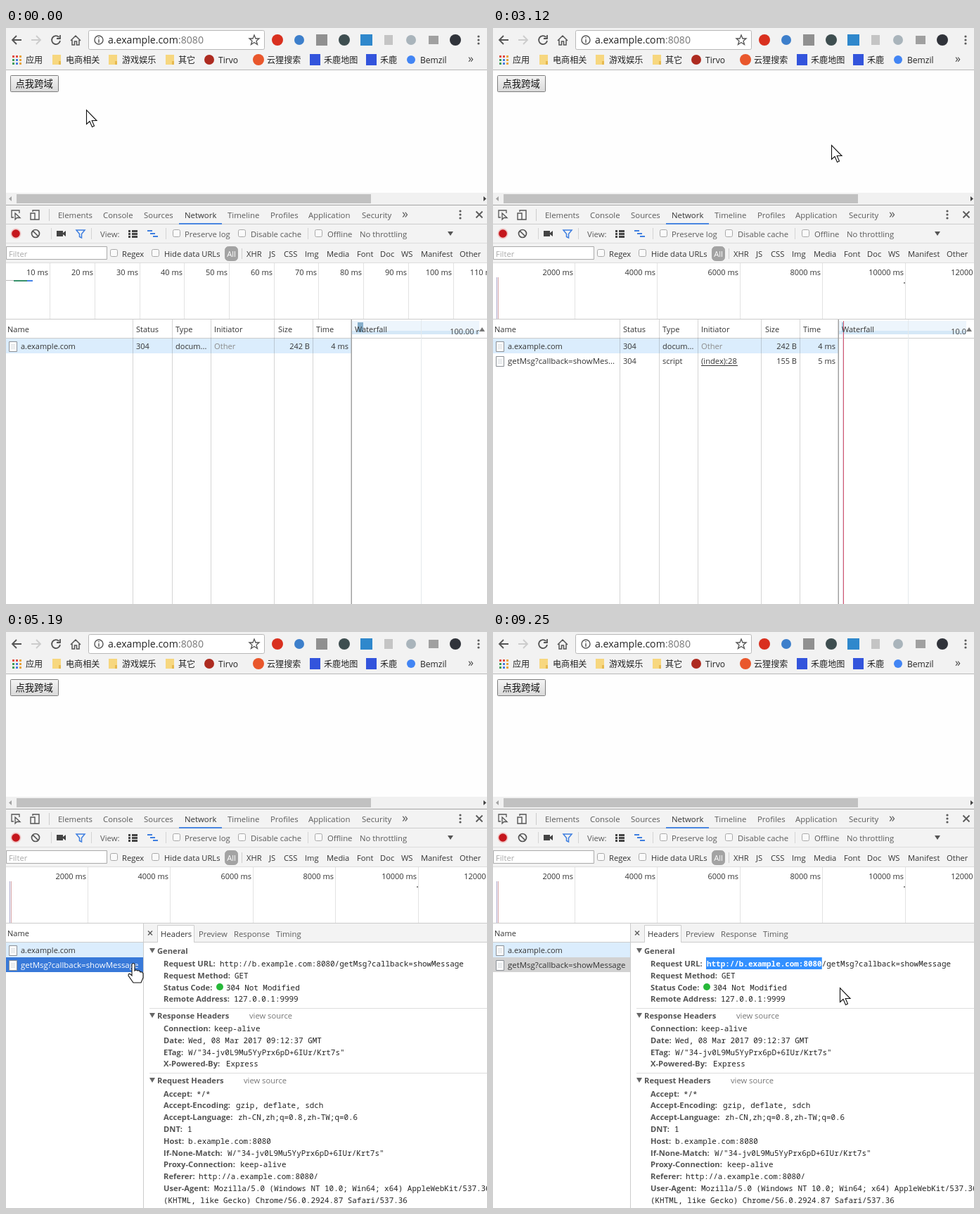
Animation of 684 by 818 pixels, one loop 9.49 s. Source, as an HTML page with a canvas:

```html
<!DOCTYPE html>
<html lang="zh-CN">
<head>
<meta charset="utf-8">
<title>JSONP demo</title>
<style>
html, body { margin: 0; width: 100%; height: 100%; overflow: hidden; background: #fff; }
canvas { display: block; }
</style>
</head>
<body>
<canvas width="684" height="818"></canvas>
<script>
const W = 684, H = 818, LOOP = 9490;
const c = document.querySelector('canvas').getContext('2d');
const SANS = '"Open Sans", "Noto Sans CJK SC", "Noto Sans CJK", sans-serif';
const MONO = '"Noto Sans Mono", monospace';
const URL_TEXT = 'http://b.example.com:8080/getMsg?callback=showMessage';
const ORIGIN_LENGTH = 25, CHAR = 6.55;

// Moments of the hard changes, in ms
const PRESS = 760, RELEASE = 850, LOADED = 960, DETAILS = 4390, TIP_END = 4460, BLUR = 6010;

// Pointer track: time, x, y
const TRACK = [
  [0, 114, 116], [260, 114, 116], [580, 52, 81], [1300, 52, 81], [1740, 130, 92],
  [2130, 291, 98], [2630, 452, 155], [2690, 460, 158], [2850, 481, 166], [3240, 481, 166],
  [3620, 250, 385], [4210, 90, 473], [4800, 90, 473], [5710, 304, 469], [6180, 304, 469],
  [6890, 457, 474], [6960, 458, 474], [7330, 468, 475], [8330, 468, 475], [8500, 486, 483],
  [9000, 486, 483], [9250, 493, 505], [LOOP, 493, 505]
];

const clamp = v => Math.max(0, Math.min(1, v));

function pointerAt(t) {
  const i = Math.max(1, TRACK.findIndex(k => k[0] > t));
  const [t0, x0, y0] = TRACK[i - 1], [t1, x1, y1] = TRACK[i];
  const p = (t - t0) / (t1 - t0);
  return [Math.round(x0 + (x1 - x0) * p), Math.round(y0 + (y1 - y0) * p)];
}

function rect(x, y, w, h, fill) {
  c.fillStyle = fill;
  c.fillRect(x, y, w, h);
}

function box(x, y, w, h, fill, border, radius = 0) {
  c.beginPath();
  c.roundRect(x + .5, y + .5, w - 1, h - 1, radius);
  c.fillStyle = fill;
  c.fill();
  c.strokeStyle = border;
  c.lineWidth = 1;
  c.stroke();
}

const vline = (x, y0, y1, color) => rect(x, y0, 1, y1 - y0, color);
const hline = (y, x0, x1, color) => rect(x0, y, x1 - x0, 1, color);

function disc(x, y, r, fill) {
  c.fillStyle = fill;
  c.beginPath();
  c.arc(x, y, r, 0, 7);
  c.fill();
}

function path(d, x, y, { fill, stroke, width = 1 }) {
  const p = new Path2D(d);
  c.save();
  c.translate(x, y);
  if (fill) { c.fillStyle = fill; c.fill(p); }
  if (stroke) { c.strokeStyle = stroke; c.lineWidth = width; c.stroke(p); }
  c.restore();
}

function text(s, x, y, size = 11, color = '#333', { align = 'left', weight = 400, family = SANS } = {}) {
  c.font = `${weight} ${size}px ${family}`;
  c.textAlign = align;
  c.fillStyle = color;
  c.fillText(s, x, y);
}

const mono = (s, x, y, color = '#222', weight) => text(s, x, y, 10.92, color, { family: MONO, weight });
const bold = (s, x, y) => text(s, x, y, 11.2, '#545454', { weight: 700 });
const checkbox = (x, y, s = 11) => box(x, y, s, s, '#fafafa', '#a8a8a8', 2);
const dots = (x, y) => [-5, 0, 5].forEach(d => disc(x, y + d, 1.6, '#5a5a5a'));
const cross = (x, y, r, width, color = '#5a5a5a') =>
  path(`M${-r} ${-r}L${r} ${r}M${r} ${-r}L${-r} ${r}`, x, y, { stroke: color, width });

function drawBrowser() {
  rect(0, 0, W, 59, '#f2f2f2');
  hline(59, 0, W, '#b9b9b9');
  const ink = { stroke: '#555', width: 1.8 };
  path('M14 6H1M7 0L1 6L7 12', 8, 11, ink);
  path('M0 6H13M7 0L13 6L7 12', 36, 11, { stroke: '#ccc', width: 1.8 });
  path('M4.5 -4A6 6 0 1 0 6 1M6 -7V-2H1', 71, 17, ink);
  path('M-7 1L0 -6L7 1M-5 0V7H-1.5V2H1.5V7H5V0', 99, 17, { stroke: '#555', width: 1.5 });
  box(117, 3, 251, 28, '#fff', '#b8b8b8', 2);
  path('M6 0A6 6 0 1 1 -6 0A6 6 0 1 1 6 0M0 -1V4M0 -4V-2.5', 132, 17, { stroke: '#555', width: 1.4 });
  text('a.example.com', 145, 22, 14.1, '#222');
  text(':8080', 245, 22, 14.1, '#777');
  path('M0 -7L2 -2L7 -2L3 1.5L4.5 6.5L0 3.5L-4.5 6.5L-3 1.5L-7 -2L-2 -2Z', 353, 17, { stroke: '#555', width: 1.3 });

  disc(386, 17, 8, '#d9301f');
  disc(417, 17, 7, '#3d7fcb');
  rect(441, 9, 16, 16, '#909090');
  disc(481, 17, 8, '#3e4e50');
  rect(504, 9, 17, 16, '#2f88cc');
  rect(538, 10, 12, 14, '#c4c4c4');
  disc(576, 17, 7, '#a9b4bb');
  rect(601, 11, 14, 12, '#a0a0a0');
  disc(639, 17, 8, '#30333a');
  dots(672, 17);

  const grid = ['#e04a3f', '#e04a3f', '#e8a33a', '#3f9d58', '#4a7ee0', '#e8a33a', '#3f9d58', '#4a7ee0', '#e8a33a'];
  grid.forEach((color, i) => rect(9 + i % 3 * 5, 39 + Math.floor(i / 3) * 5, 3, 3, color));
  [66, 146, 227].forEach(x => {
    rect(x, 38, 12, 14, '#f7d77f');
    rect(x + 9, 47, 3, 5, '#e6b94f');
  });
  disc(289, 45, 7, '#ad2b20');
  disc(359, 45, 8, '#e9572c');
  rect(432, 37, 15, 16, '#3354dc');
  rect(512, 37, 15, 16, '#3354dc');
  disc(576, 45, 6, '#4285f4');
  const marks = [['应用', 28], ['电商相关', 85], ['游戏娱乐', 165], ['其它', 245], ['Tirvo', 302],
    ['云狸搜索', 371], ['禾鹿地图', 452], ['禾鹿', 532], ['Bemzil', 589]];
  marks.forEach(([s, x]) => text(s, x, 49.5, 12.1, '#222'));
  text('»', 657, 49, 16, '#444');
}

function drawPage(t, x, y) {
  rect(0, 60, W, 174, '#fefefe');
  const pressed = t >= PRESS && t < RELEASE;
  const hover = x >= 6 && x < 75 && y >= 68 && y < 91;
  const shade = c.createLinearGradient(0, 68, 0, 90);
  shade.addColorStop(0, pressed ? '#d8d8d8' : hover ? '#fafafa' : '#f4f4f4');
  shade.addColorStop(1, pressed ? '#eee' : hover ? '#e2e2e2' : '#dadada');
  box(6, 67, 69, 24, shade, hover ? '#666' : '#7c7c7c', 1);
  text('点我跨域', 13.5, 84, 13.33, '#111');

  rect(0, 234, W, 17, '#f1f1f1');
  rect(15, 236, 504, 13, '#c1c1c1');
  path('M4 0V7L0 3.5Z', 4, 239, { fill: '#a3a3a3' });
  path('M0 0V7L4 3.5Z', 679, 239, { fill: '#444' });
}

function drawTools() {
  rect(0, 251, W, 83, '#f3f3f3');
  hline(251, 0, W, '#a5a5a5');
  [278, 305, 333].forEach((y, i) => hline(y, 0, W, i ? '#ddd' : '#ccc'));
  path('M4 11H1V1H12V5M6 5V14L8.5 11.5H13Z', 7, 258, { stroke: '#555', width: 1.3 });
  path('M4 3V1H13V14H7M1 5H7V14H1Z', 34, 258, { stroke: '#555', width: 1.4 });
  vline(61, 257, 274, '#ccc');
  const tabs = [['Elements', 74], ['Console', 138], ['Sources', 196], ['Network', 254], ['Timeline', 315],
    ['Profiles', 376], ['Application', 430], ['Security', 506]];
  tabs.forEach(([s, x]) => text(s, x, 270, 11.4, s === 'Network' ? '#333' : '#5a5a5a'));
  rect(246, 277, 61, 2, '#4a86e0');
  text('»', 563, 270, 18, '#5a5a5a');
  dots(646, 265);
  cross(673, 265, 4.5, 1.8);

  disc(14, 292, 7.5, '#f0c9c9');
  disc(14, 292, 5.8, '#c5161c');
  path('M5.5 0A5.5 5.5 0 1 1 -5.5 0A5.5 5.5 0 1 1 5.5 0M-4 -4L4 4', 42, 292, { stroke: '#555', width: 1.7 });
  path('M0 0H9V3L13 0V8L9 5V8H0Z', 72, 288, { fill: '#444' });
  path('M0 0H12L7.5 5.5V11L4.5 9.5V5.5Z', 100, 287, { stroke: '#3f7fe0', width: 1.5 });
  [64, 121, 227, 429].forEach(x => vline(x, 284, 300, '#d4d4d4'));
  text('View:', 134, 296.5, 11.3, '#5a5a5a');
  [287, 291, 295].forEach((y, i) => {
    rect(174, y, 3, 3, '#444');
    rect(179, y, 8, 3, '#444');
    rect(201 + i * 4, y, 7, 2, '#3f7fe0');
  });
  [237, 330, 439].forEach(x => checkbox(x, 286));
  [['Preserve log', 254], ['Disable cache', 348], ['Offline', 457], ['No throttling', 503]]
    .forEach(([s, x]) => text(s, x, 296.5, 11.3, '#5a5a5a'));
  path('M0 0H8L4 6Z', 628, 289, { fill: '#555' });

  box(0, 310, 144, 19, '#fff', '#aaa');
  text('Filter', 4, 325, 11.2, '#aaa');
  checkbox(148, 314);
  checkbox(207, 314);
  text('Regex', 165, 324.5, 11.2);
  text('Hide data URLs', 225, 324.5, 11.2);
  box(311, 310, 19, 21, '#a3a3a3', '#a3a3a3', 5);
  text('All', 320.5, 325, 11.2, '#fff', { align: 'center' });
  vline(335, 313, 328, '#ccc');
  [['XHR', 342], ['JS', 374], ['CSS', 395], ['Img', 425], ['Media', 456], ['Font', 499], ['Doc', 532],
    ['WS', 562], ['Manifest', 590], ['Other', 645]].forEach(([s, x]) => text(s, x, 325, 11.2));
}

function drawOverview(loaded) {
  rect(0, 334, W, 79, '#fff');
  const gap = loaded ? 117.4 : 63.7, unit = loaded ? 2000 : 10;
  for (let i = 1; i < 12; i++) {
    const x = Math.round(i * gap - 1.5);
    if (x < W) vline(x, 334, 413, '#e2e2e2');
    text(`${i * unit} ms`, x - 2, 351, 11, '#333', { align: 'right' });
  }
  if (loaded) {
    vline(5, 354, 413, '#a9a3c9');
    vline(7, 354, 413, '#d3a3a8');
    rect(584, 361, 2, 2, '#888');
  } else {
    rect(0, 358, 11, 1, '#bbb');
    rect(11, 358, 19, 2, '#36906a');
    rect(30, 358, 8, 2, '#4382e8');
  }
  hline(413, 0, W, '#ccc');
}

function fileIcon(y) {
  box(4, y, 12, 15, '#fff', '#8b9096');
  for (let i = 4; i < 12; i += 2) hline(y + i, 7, 13, '#d9dde0');
}

function drawTable(loaded) {
  rect(0, 414, W, H - 414, '#fff');
  rect(0, 441, 491, 21, '#dbedfd');
  rect(492, 416, 181, 14, '#edf5fc');
  rect(492, 430, 181, 5, '#d5e8f7');
  hline(440, 0, W, '#ccc');
  [180, 236, 291, 381, 436].forEach(x => vline(x, 414, H, 'rgba(90,90,90,.25)'));
  vline(590, 414, H, '#e4e9ec');
  rect(490.5, 414, 1.5, H - 414, '#a2a2a2');
  if (loaded) {
    rect(496, 418, 3, 14, '#a6c6de');
    vline(497, 432, H, '#e6d6e4');
    vline(498, 416, H, '#d2566f');
  } else {
    rect(500, 418, 8, 14, '#86aeca');
  }
  [['Name', 2], ['Status', 185], ['Type', 241], ['Initiator', 296], ['Size', 387], ['Time', 441], ['Waterfall', 496]]
    .forEach(([s, x]) => text(s, x, 432));
  text(loaded ? '10.0' : '100.00 r', 673, 435, 11, '#444', { align: 'right' });
  path('M0 6H8L4 0Z', 673, 425, { fill: '#777' });

  const rows = [['a.example.com', 'docum...', 'Other', '242 B', '4 ms']];
  if (loaded) rows.push(['getMsg?callback=showMes...', 'script', '(index):28', '155 B', '5 ms']);
  rows.forEach(([name, type, initiator, size, time], i) => {
    const y = 456 + i * 21;
    fileIcon(y - 11);
    text(name, 21, y, i ? 11.45 : 11);
    text('304', 185, y);
    text(type, 241, y);
    text(initiator, 296, y, 11.2, i ? '#333' : '#8a8a8a');
    if (i) hline(y + 2, 296, 348, '#333');
    text(size, 432, y, 11, '#333', { align: 'right' });
    text(time, 487, y, 11, '#333', { align: 'right' });
  });
}

const SECTIONS = [
  ['General', 457, 475, [
    ['Request URL:', 304, URL_TEXT], ['Request Method:', 325, 'GET'],
    ['Status Code:', 313, '304 Not Modified'], ['Remote Address:', 324, '127.0.0.1:9999']]],
  ['Response Headers', 549, 567, [
    ['Connection:', 296, 'keep-alive'], ['Date:', 259, 'Wed, 08 Mar 2017 09:12:37 GMT'],
    ['ETag:', 259, 'W/"34-jv0L9Mu5YyPrx6pD+6IUr/Krt7s"'], ['X-Powered-By:', 313, 'Express']], 346],
  ['Request Headers', 641, 659.5, [
    ['Accept:', 271, '*/*'], ['Accept-Encoding:', 327, 'gzip, deflate, sdch'],
    ['Accept-Language:', 330, 'zh-CN,zh;q=0.8,zh-TW;q=0.6'], ['DNT:', 258, '1'],
    ['Host:', 259, 'b.example.com:8080'], ['If-None-Match:', 315, 'W/"34-jv0L9Mu5YyPrx6pD+6IUr/Krt7s"'],
    ['Proxy-Connection:', 333, 'keep-alive'], ['Referer:', 274, 'http://a.example.com:8080/'],
    ['User-Agent:', 296, 'Mozilla/5.0 (Windows NT 10.0; Win64; x64) AppleWebKit/537.36'],
    ['', 224, '(KHTML, like Gecko) Chrome/56.0.2924.87 Safari/537.36']], 338]
];

function drawDetails(t, pointerX) {
  rect(0, 414, W, H - 414, '#fff');
  rect(196, 414, W - 196, 26, '#f3f3f3');
  hline(440, 0, W, '#ccc');
  vline(195, 414, H, '#ccc');
  text('Name', 2, 432);
  rect(0, 441, 195, 21, '#dbedfd');
  const focused = t < BLUR;
  rect(0, 462, 195, 21, focused ? '#3879d9' : '#d2d2d2');
  fileIcon(445);
  fileIcon(466);
  text('a.example.com', 21, 456);
  text('getMsg?callback=showMessage', 21, 477, 11.45, focused ? '#fff' : '#333');

  cross(205, 427.5, 3, 1.4);
  box(215, 416, 53, 25, '#fff', '#ccc');
  rect(216, 440, 51, 1, '#fff');
  [['Headers', 220], ['Preview', 274], ['Response', 324], ['Timing', 384]]
    .forEach(([s, x]) => text(s, x, 433, 11.3, x === 220 ? '#333' : '#5a5a5a'));

  if (t > 6180) {
    const n = Math.max(0, Math.min(ORIGIN_LENGTH, Math.round((pointerX - 304) / CHAR)));
    rect(303, 462, n * CHAR + (n ? 1 : 0), 17, '#3390ff');
  }
  SECTIONS.forEach(([title, titleY, firstY, rows, sourceX]) => {
    path('M0 0H8L4 7Z', 204, titleY - 8, { fill: '#666' });
    bold(title, 215, titleY);
    if (sourceX) {
      hline(titleY - 15, 204, W, '#ddd');
      text('view source', sourceX, titleY, 11.2, '#777');
    }
    rows.forEach(([label, x, value], i) => {
      const y = firstY + i * 16.8;
      const selected = value === URL_TEXT && t > 6180
        ? Math.max(0, Math.min(ORIGIN_LENGTH, Math.round((pointerX - 304) / CHAR))) : 0;
      bold(label, 224, y);
      mono(value.slice(0, selected), x, y, '#fff', 700);
      mono(value.slice(selected), x + selected * CHAR, y);
    });
  });
  disc(304, 504, 5, '#27b93a');

  if (t < TIP_END) {
    c.globalAlpha = .45;
    box(104, 474, 330, 23, '#fff', '#aaa', 2);
    text(URL_TEXT, 111, 490, 11.2, '#555');
    c.globalAlpha = 1;
  }
}

function drawDialog(t) {
  const shown = clamp((t - 980) / 200) * (1 - clamp((t - 2930) / 120));
  if (!shown) return;
  const scale = .94 + .06 * shown;
  c.save();
  c.globalAlpha = shown;
  c.translate(343, 115.5);
  c.scale(scale, scale);
  c.translate(-343, -115.5);
  c.save();
  c.shadowColor = 'rgba(0,0,0,.35)';
  c.shadowBlur = 3;
  c.shadowOffsetY = 1;
  rect(125, 33, 436, 165, '#fff');
  c.restore();
  box(124, 32, 438, 167, '#fff', '#c4c4c4', 2);
  text('a.example.com:8080 显示：', 145, 62, 15, '#222');
  text('Origin Crossing Succeeded with JSONP', 145, 91, 12.4, '#222');
  checkbox(146, 106, 14);
  text('禁止此页再显示对话框。', 165, 118, 12, '#222');
  cross(547, 47, 3.5, 1.7);
  box(469, 147, 70, 29, t > 2800 ? '#e8f1fc' : '#fff', '#3d82d8', 1);
  text('确定', 504, 166, 12.3, '#222', { align: 'center', weight: 700 });
  c.restore();
}

function drawPointer(x, y) {
  const overName = x < 195 && y > 441;
  const shape = overName
    ? 'M-3 1Q-1 -2 1 1V10Q3 8 5 10Q8 9 9 12Q12 11 13 14V20L10 27H-1L-8 17Q-8 13 -5 15L-3 17Z'
    : 'M.5 .5V20.5L5 16.5L8.5 24.5L11.5 23L8.2 15.5H15Z';
  path(shape, x, y, { fill: '#fff', stroke: '#111', width: 1.1 });
}

function draw() {
  const t = performance.now() % LOOP;
  const [x, y] = pointerAt(t);
  const loaded = t >= LOADED;
  drawBrowser();
  drawPage(t, x, y);
  drawTools();
  drawOverview(loaded);
  if (t < DETAILS) drawTable(loaded);
  else drawDetails(t, x);
  drawDialog(t);
  drawPointer(x, y);
  requestAnimationFrame(draw);
}
draw();
</script>
</body>
</html>
```
